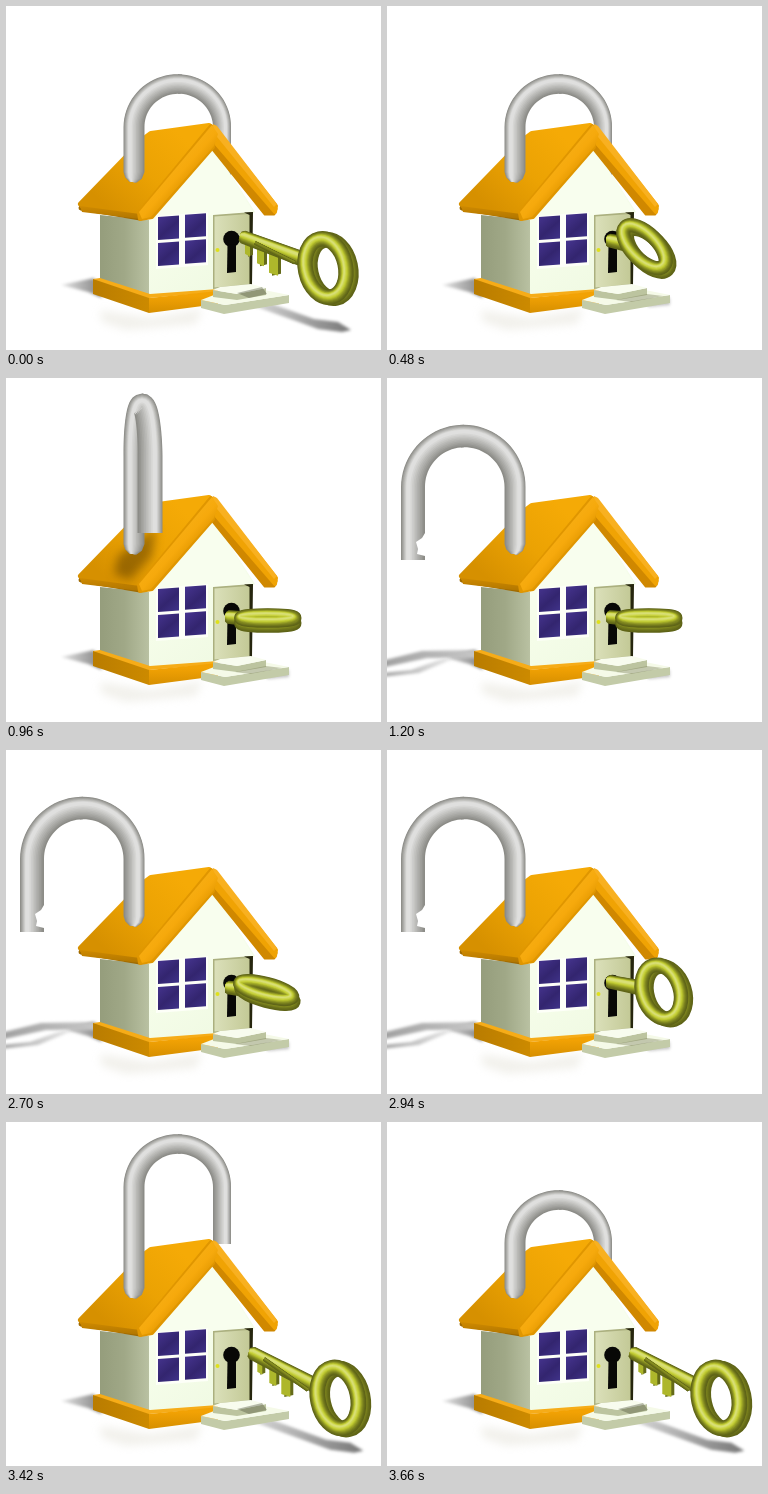
An HTML page with a canvas that plays this animation: 375x344 px, repeating every 6160 ms.

```html
<!DOCTYPE html>
<html lang="en">
<head>
<meta charset="utf-8">
<title>House lock</title>
<style>
html, body { margin: 0; width: 100%; height: 100%; overflow: hidden; background: #fff; }
canvas { display: block; width: 375px; height: 344px; }
</style>
</head>
<body>
<canvas id="stage" width="375" height="344"></canvas>
<script>
const ctx = document.getElementById('stage').getContext('2d');
const LOOP = 6160, STEP = 120, REVERSE = 2700;
const clamp = (v, lo, hi) => Math.min(hi, Math.max(lo, v));
const smooth = v => (v = clamp(v, 0, 1), v * v * (3 - 2 * v));

function poly(fill, ...pts) {
  ctx.beginPath();
  for (let i = 0; i < pts.length; i += 2) ctx.lineTo(pts[i], pts[i + 1]);
  ctx.closePath();
  ctx.fillStyle = fill;
  ctx.fill();
}

// Rounds the corners by stroking the outline in the fill colour.
function soft(fill, r, ...pts) {
  poly(fill, ...pts);
  ctx.strokeStyle = fill;
  ctx.lineWidth = r;
  ctx.lineJoin = 'round';
  ctx.stroke();
}

function disc(fill, x, y, r) {
  ctx.fillStyle = fill;
  ctx.beginPath();
  ctx.arc(x, y, r, 0, 7);
  ctx.fill();
}

function grad(x0, y0, x1, y1, ...colors) {
  const g = ctx.createLinearGradient(x0, y0, x1, y1);
  colors.forEach((c, i) => g.addColorStop(i / (colors.length - 1), c));
  return g;
}

function blurred(px, ...shape) {
  ctx.save();
  ctx.filter = `blur(${px}px)`;
  poly(...shape);
  ctx.restore();
}

// Shading from the dark rim (0) to the highlight (1).
const shades = Array.from({ length: 10 }, (_, i) => i / 10);
const steel = t => `hsl(60 2% ${54 + 37 * t}%)`;
const brass = t => `hsl(64 62% ${24 + 50 * t ** 1.5}%)`;

// Points are [x, y, width]; nested strips close in on a highlight off the centre line.
function tube(pts, color, side = 1, from = 0, to = pts.length) {
  const ribs = pts.map(([x, y, w], i) => {
    const a = pts[Math.max(0, i - 1)], b = pts[Math.min(pts.length - 1, i + 1)];
    const dx = b[0] - a[0], dy = b[1] - a[1], k = side * w / 2 / Math.hypot(dx, dy);
    return [x, y, dy * k, -dx * k];
  }).slice(from, to);
  const edge = o => ribs.map(([x, y, nx, ny]) => [x + nx * o, y + ny * o]);
  for (const t of shades) {
    poly(color(t), ...edge(1.35 * t - 1).concat(edge(1 - .5 * t).reverse()).flat());
  }
}

function groundShadows(open) {
  blurred(1.5, grad(55, 0, 92, 0, '#e4e4e4', '#8a8a8a'), 55, 279, 88, 272, 96, 292, 82, 286);
  blurred(4, 'rgba(222,220,208,.4)', 94, 304, 143, 312, 196, 303, 190, 318, 120, 324, 96, 316);
  if (!open) return;
  ctx.globalAlpha = open;
  blurred(1.5, grad(0, 0, 90, 0, '#a2a2a2', '#c6c6c6'), -6, 283, 35, 273, 90, 272, 90, 280, 40, 280, -6, 290);
  blurred(1.5, grad(0, 0, 62, 0, '#a8a8a8', '#e6e6e6'), -6, 295, 24, 292, 58, 280, 66, 281, 32, 295, -6, 299);
  ctx.globalAlpha = 1;
}

function keyShadow({ cx, cy, out }) {
  if (!out) {
    blurred(1.8, 'rgba(90,90,90,.35)', 250, 291, 283, 292, 283, 299, 262, 301);
    return;
  }
  const x = cx - 6, y = cy * .35 + 230;
  blurred(1.6, grad(246, 0, x + 28, 0, '#d8d8d8', '#777'), 245, 299, 266, 298, x - 8, y - 9,
    x + 16, y - 6, x + 29, y + 2, x + 20, y + 4, x - 4, y + 1, x - 26, y - 7);
}

function walls() {
  poly(grad(94, 0, 143, 0, '#959d7c', '#a0a887', '#b9c1a2'), 94, 209, 143, 214, 143, 291, 94, 275);
  poly(grad(150, 160, 240, 280, '#fbfff2', '#f5fde9', '#eff9e2'),
    143, 214, 206, 139, 249, 206, 245, 209, 245, 281, 143, 291);
}

function plinth() {
  poly(grad(87, 0, 143, 0, '#b97c00', '#cc8a00'), 87, 273, 94, 274, 143, 290, 143, 307, 87, 288);
  poly('#f6ac18', 87, 273, 94, 272, 144, 288, 212, 283, 212, 286, 143, 292);
  poly(grad(0, 290, 0, 306, '#f2a204', '#d89000'), 143, 292, 212, 285, 212, 298, 143, 307);
}

function roofSlope(swing) {
  soft('#a06a00', 5, 75, 202, 134, 212, 142, 210);
  soft(grad(100, 200, 170, 125, '#d69000', '#eba203', '#f5aa06'), 6,
    75, 198, 137, 134, 145, 128, 203, 120, 206, 124, 135, 207, 78, 201);
  poly(grad(0, 196, 0, 214, '#d89000', '#ae7400'), 74, 200, 134, 208, 134, 213, 76, 206);
  blurred(5, `rgba(70,45,0,${.45 * Math.max(0, swing)})`, 112, 178, 150, 150, 146, 178, 124, 202, 108, 196);
}

function gable() {
  soft('#d08800', 3, 208, 121, 270, 203, 268, 208, 259, 208, 206, 142);
  soft('#f0a304', 4, 208, 121, 270, 200, 269, 206, 207, 134);
  poly('#f8b020', 207, 118, 211, 120, 271, 198, 268, 201, 207, 126);
  soft('#e09600', 4, 205, 120, 133, 207, 134, 213, 146, 211, 207, 141);
  poly(grad(165, 162, 181, 176, '#f7ad12', '#f6a90c', '#e59a02'),
    206, 119, 133, 206, 136, 213, 145, 211, 208, 140, 212, 128);
}

function windowAndDoor() {
  poly('#fdfff8', 150, 210, 202, 206, 202, 259, 150, 263);
  for (const x of [152, 179]) for (const y of [211, 237]) {
    const d = (x - 152) * .08;
    poly(grad(x, y, x + 21, y + 24, '#44338c', '#33256f', '#41348c'),
      x, y - d, x + 21, y - 1.6 - d, x + 21, y + 21.5 - d, x, y + 23 - d);
  }
  poly('#abb07f', 207, 209, 246, 206, 246, 279, 207, 283);
  poly(grad(208, 0, 244, 0, '#dbe0ba', '#c3c996'), 208.5, 210.5, 243, 208, 243, 278, 208.5, 281.5);
  poly('#26260e', 238, 206.5, 247, 206, 246, 279, 243.6, 279, 243.6, 209);
  disc('#dfe11a', 211.5, 244, 2);
  disc('#080806', 225.5, 233, 8.3);
  poly('#080806', 221.5, 239, 230, 238, 230, 266, 221, 267);
}

function steps(shaded) {
  poly('#c3cba8', 195, 294, 219, 299, 283, 289, 283, 297, 218, 308, 195, 302);
  poly('#f5fae8', 195, 294, 208, 289, 258, 284, 283, 289, 219, 299);
  poly('#bcc49f', 207, 284, 231, 288, 260, 282, 260, 289, 231, 294, 207, 291);
  poly('#f8fcee', 207, 284, 214, 281, 245, 278, 260, 282, 231, 288);
  if (shaded) poly('rgba(80,84,60,.4)', 231, 287, 256, 281, 261, 288, 243, 292);
  else poly('rgba(120,126,85,.4)', 229, 294, 260, 288, 276, 290, 244, 296);
}

// Lifts over two steps, then swings half a turn towards the viewer over four.
function shackle(s) {
  const turn = Math.max(0, s - 2) * Math.PI / 4;
  const sin = Math.sin(turn), cos = Math.cos(turn), half = (1 - cos) / 2;
  const x = 128, w = 21, N = 40;
  const dx = 2 * Math.round((95 * cos + 23 * sin - 8) / 2);
  const top = 78 - 28 * Math.min(s, 2) + 36 * half - 13 * sin;
  const rise = 43 + 8 * half + 4 * sin;
  const end = top + 100 + 24 * half + 16 * sin;
  const endW = 18 + 6 * half + 4 * sin;
  const pts = [[x - 1, 176, w * .35], [x - .5, 172, w * .8], [x, 166, w]];
  const mid = pts.length + N / 2;
  for (let i = 0; i <= N; i++) {
    const a = Math.PI * i / N;
    pts.push([x + dx * (1 - Math.cos(a)) / 2, top + rise * (1 - Math.sin(a)), w + (endW - w) * i / N]);
  }
  pts.push([x + dx, end, endW]);
  const side = Math.sign(dx);
  tube(pts, steel, side, 0, mid + 2);
  tube(pts, steel, side, mid);
  // latch notch, seen once the leg faces us
  if (half === 1) poly('#fff', 38, 155, 35, 160, 29, 164, 31, 171, 30, 176, 38, 178);
}

// Slides in from k = -1, then turns a quarter until k = 6.
function keyPose(k) {
  const turn = smooth((k - 2.4) / 3.6), slide = Math.min(k, 4);
  return {
    cx: 322 - 13 * slide - .7 * slide * slide + 3 * turn ** 2,
    cy: 242.5 + Math.max(0, 20 - 14 * k),
    rx: 20 - 17 * turn, ry: 26.5 + 3 * .7 ** k,
    tilt: -(12 + 78 * turn) * Math.PI / 180,
    tx: Math.max(222, 237 - 9 * k), ty: 231 + 8 * turn,
    w: 15.5 - .3 * k, out: k < 3
  };
}

function key({ cx, cy, rx, ry, tilt, tx, ty, w, out }) {
  ctx.save();
  ctx.beginPath();
  ctx.rect(219, 0, 160, 344);
  ctx.clip();
  const d = Math.hypot(cx - tx, cy - ty), ux = (cx - tx) / d, uy = (cy - ty) / d;
  const ex = cx - ux * (rx + 3), ey = cy - uy * (rx + 3);
  for (let i = 0; out && i < 3; i++) {
    const x = cx - 83 + 12 * i, y = ty + (x - tx) * uy / ux, r = x + 5 + 2 * i, b = y + 19 + 5 * i;
    poly(brass(.1), x + 3, y, r + 3, y + 2, r + 3, b - 2, x + 3, b);
    poly(brass(.55), x, y, r, y + 2, r, b, x, b - 3);
  }
  tube([[tx - 3, ty - 1, 9], [tx, ty, 13.5], [ex, ey, 15.5]], brass);
  if (out) tube([[tx + 12, ty + 6, 4], [ex - 12, ey + 2, 4]], t => brass(t * .4));

  // the back rim shows past the front one along the minor axis
  const ox = 2.5 * Math.cos(tilt), oy = -2.5 * Math.sin(tilt);
  for (const [sx, sy, lit] of [[ox, oy, .7], [-ox, -oy, 1]]) {
    for (const t of shades) {
      ctx.beginPath();
      ctx.ellipse(cx + sx - 2 * t, cy + sy - 2 * t, rx, ry, tilt, 0, 7);
      ctx.strokeStyle = brass(t * lit);
      ctx.lineWidth = w * (1 - t);
      ctx.stroke();
    }
  }
  ctx.restore();
}

// Key and shackle steps; the way back mirrors the way in.
function pose(t) {
  if (t < REVERSE) {
    const n = Math.min(10, Math.floor(t / STEP));
    return [Math.min(n, 6), Math.max(0, n - 4)];
  }
  const n = Math.min(8, Math.floor((t - REVERSE) / STEP));
  return [Math.max(-1, 5 - n), Math.min(6, 8 - n)];
}

function draw(k, s) {
  const kp = keyPose(k);
  ctx.fillStyle = '#fff';
  ctx.fillRect(0, 0, 375, 344);
  groundShadows(clamp((s - 4) / 2, 0, 1));
  keyShadow(kp);
  walls();
  plinth();
  roofSlope(Math.sin(Math.max(0, s - 2) * Math.PI / 4));
  shackle(s);
  poly('#f8feee', 146, 211, 206, 138, 247, 205, 247, 208);
  gable();
  windowAndDoor();
  steps(kp.out);
  key(kp);
}

let start, last;
function tick(now) {
  start ??= now;
  const [k, s] = pose((now - start) % LOOP), id = k * 10 + s;
  if (last !== id) draw(k, s);
  last = id;
  requestAnimationFrame(tick);
}
draw(0, 0);
requestAnimationFrame(tick);
</script>
</body>
</html>
```
